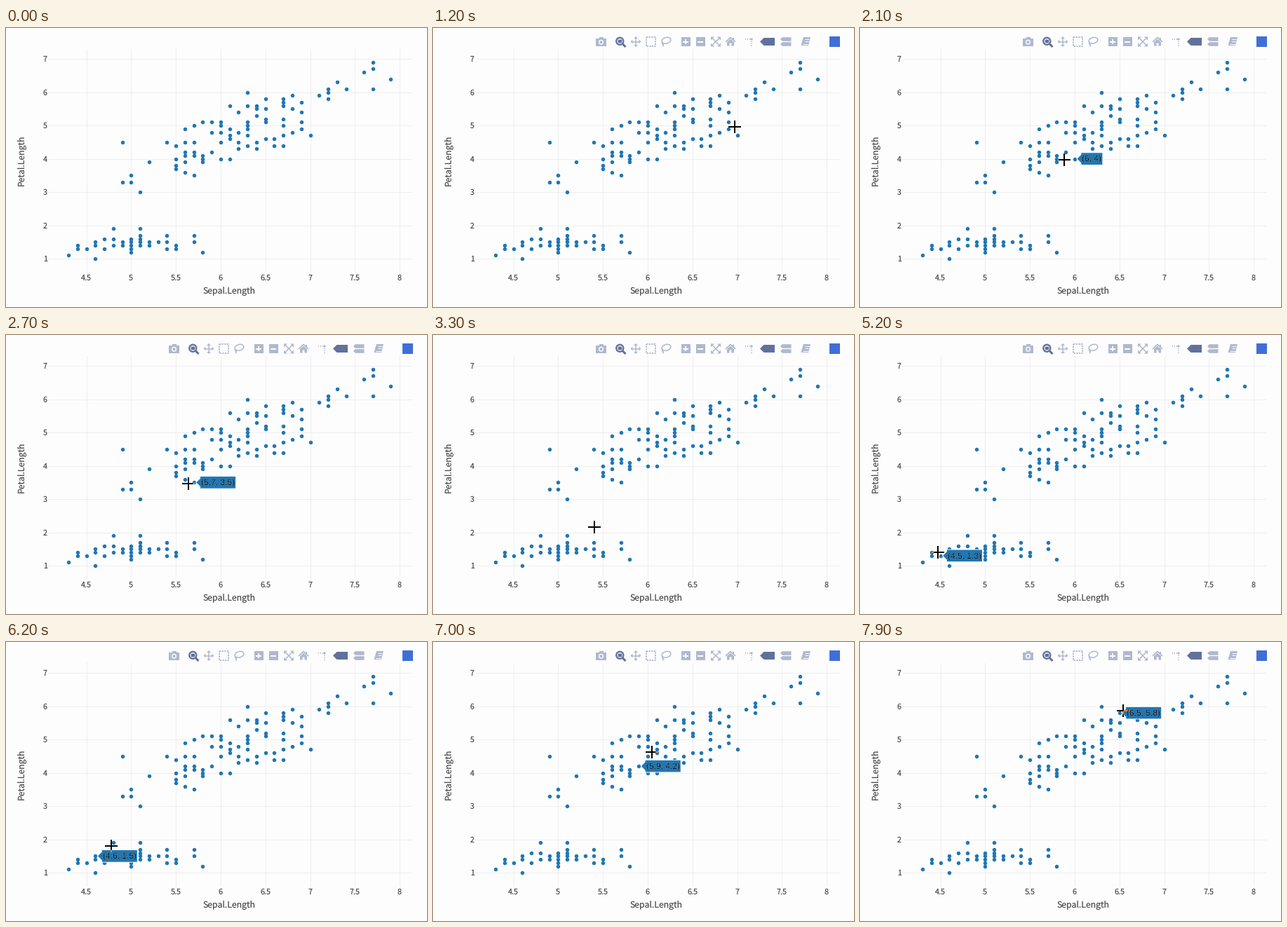
A matplotlib script that plays this animation: 600x398 px, repeating every 8000 ms.

```python
import numpy as np
import matplotlib.pyplot as plt
from matplotlib.animation import FuncAnimation
from matplotlib.patches import Circle, Ellipse, Polygon

W, H, DPI = 600, 398, 64
PT = 72 / DPI  # points per pixel
BG, BLUE, INVERSE = "#fdfdfe", "#1f77b4", "#e0884b"
GRID, INK = "#eeeef0", "#505050"
LIGHT, DARK = "#b0b8ce", "#62719b"
AXIS_FONT, TIP_FONT = "Noto Sans CJK JP", "Liberation Sans"
FRAMES, ENTER = 80, 8
REACH = 21  # hover distance in pixels

plt.rcParams["text.hinting"] = "none"

# Petal lengths (mm) for each sepal length from 4.3 in steps of 0.1
COLUMNS = [
    [11], [13, 14], [13], [10, 14, 15], [13, 16], [14, 16, 19],
    [14, 15, 33, 45], [12, 13, 14, 15, 16, 33, 35],
    [14, 15, 16, 17, 19, 30], [14, 15, 39], [15], [13, 15, 17, 45],
    [13, 14, 37, 38, 40, 44], [36, 39, 41, 42, 45, 49],
    [15, 17, 35, 41, 42, 45, 50], [12, 39, 40, 41, 51], [42, 48, 51],
    [40, 45, 48, 50, 51], [40, 46, 47, 49, 56], [43, 45, 48, 54],
    [44, 47, 49, 50, 51, 56, 60], [43, 45, 53, 55, 56],
    [46, 51, 52, 55, 58], [44, 46], [44, 47, 50, 52, 56, 57, 58],
    [48, 55, 59], [49, 51, 54, 57], [47], [59], [58, 60, 61], [63], [61],
    [], [66], [61, 67, 69], [], [64],
]
DATA = np.array([((43 + i) / 10, v / 10)
                 for i, col in enumerate(COLUMNS) for v in col])

# Pointer path: frame, x, y
PATH = np.array([
    (8, 566, 104), (11, 468, 130), (15, 333, 171), (16, 326, 174),
    (21, 291, 188), (25, 271, 198), (29, 250, 232), (33, 230, 274),
    (34, 229, 284), (38, 207, 304), (41, 179, 317), (43, 177, 316),
    (48, 140, 295), (52, 111, 310), (55, 97, 323), (58, 97, 323),
    (67, 265, 211), (70, 312, 157), (76, 359, 123), (79, 375, 98),
], float)


def px(v):
    return 178.3 + 127.6 * (v - 5)


def py(v):
    return 329.1 - 47.5 * (v - 1)


def smooth(t, keys, vals):
    """Monotone cubic through the keys, without overshoot."""
    step = np.diff(keys)
    d = np.diff(vals) / step
    m = np.zeros(len(vals))
    for k in range(1, len(d)):
        if d[k - 1] * d[k] > 0:
            m[k] = 2 * d[k - 1] * d[k] / (d[k - 1] + d[k])
    m[0], m[-1] = d[0], d[-1]
    k = int(np.clip(np.searchsorted(keys, t, "right") - 1, 0, len(d) - 1))
    h = step[k]
    u = (t - keys[k]) / h
    return ((1 + 2 * u) * (1 - u) ** 2 * vals[k] + u * (1 - u) ** 2 * h * m[k]
            + u * u * (3 - 2 * u) * vals[k + 1] + u * u * (u - 1) * h * m[k + 1])


def pointer(i):
    t, x, y = PATH.T
    return smooth(i, t, x), smooth(i, t, y)


fig = plt.figure(figsize=(W / DPI, H / DPI), dpi=DPI, facecolor=BG)
ax = fig.add_axes([0, 0, 1, 1])
ax.set_xlim(0, W)
ax.set_ylim(H, 0)
ax.axis("off")


def write(x, y, s, size, font=AXIS_FONT, color=INK, **kw):
    return ax.text(x, y, s, fontsize=size * PT, family=font, color=color,
                   va="baseline", **kw)


# ---- chart ----
LEFT, RIGHT, TOP, BOTTOM = 60, 578, 30, 348
for v in np.arange(4.5, 8.1, 0.5):
    ax.plot([px(v)] * 2, [TOP, BOTTOM], color=GRID, lw=PT, zorder=1)
    write(px(v), 360, f"{v:g}", 10.8, ha="center")
for v in range(1, 8):
    ax.plot([LEFT, RIGHT], [py(v)] * 2, color=GRID, lw=PT, zorder=1)
    write(59, py(v) + 4, str(v), 10.8, ha="right")
write(318.5, 380, "Sepal.Length", 12.2, ha="center")
write(26.5, 189, "Petal.Length", 12.2, ha="center", rotation=90,
      rotation_mode="anchor")
ax.plot([0, W], [H - 0.5] * 2, color="#cfcfd2", lw=PT)
ax.plot([W - 0.5] * 2, [0, H], color="#e2e2e5", lw=PT)

X, Y = px(DATA[:, 0]), py(DATA[:, 1])


def dots(color, z):
    return ax.scatter(X, Y, s=(5.5 * PT) ** 2, c=color, lw=0, zorder=z)


dots(BLUE, 2)

# ---- toolbar ----
bar = []


def keep(patch):
    patch.set_zorder(3 + 0.01 * len(bar))
    bar.append(ax.add_patch(patch))


def poly(*pts, c=LIGHT):
    keep(Polygon(pts, fc=c, lw=0))


def box(x0, y0, x1, y1, c=LIGHT):
    poly((x0, y0), (x1, y0), (x1, y1), (x0, y1), c=c)


def disc(x, y, r, c=LIGHT):
    keep(Circle((x, y), r, fc=c, lw=0))


def line(*pts, c=LIGHT, w=1.5, ls="-"):
    art, = ax.plot(*zip(*pts), color=c, lw=w * PT, ls=ls,
                   solid_capstyle="butt", zorder=3 + 0.01 * len(bar))
    bar.append(art)


def tag(x0, x1, y, h, c=LIGHT):
    tip = x0 + h
    poly((x0, y), (tip, y - h), (x1, y - h), (x1, y + h), (tip, y + h), c=c)


def camera(x, y):
    box(x - 7.5, y - 4.5, x + 7.5, y + 6)
    box(x - 3, y - 6.5, x + 3, y - 4)
    disc(x, y + 0.7, 3.6, BG)
    disc(x, y + 0.7, 2.1)


def magnifier(x, y):
    line((x + 3, y + 3), (x + 7.5, y + 7.5), c=DARK, w=3)
    disc(x - 0.7, y - 0.7, 6.2, DARK)
    disc(x - 0.7, y - 0.7, 4.1, "#cdd3e2")
    box(x - 3, y - 2.8, x + 1.6, y + 1.4, DARK)


def pan(x, y):
    line((x - 6, y), (x + 6, y))
    line((x, y - 6), (x, y + 6))
    for dx, dy in ((1, 0), (-1, 0), (0, 1), (0, -1)):
        poly((x + 7.5 * dx, y + 7.5 * dy),
             (x + 4.5 * dx - 3 * dy, y + 4.5 * dy + 3 * dx),
             (x + 4.5 * dx + 3 * dy, y + 4.5 * dy - 3 * dx))


def select(x, y):
    r = 6.3
    line((x - r, y - r), (x + r, y - r), (x + r, y + r), (x - r, y + r),
         (x - r, y - r), w=1.8, ls=(0, (1.3, 0.7)))


def lasso(x, y):
    keep(Ellipse((x + 0.5, y - 1.7), 13, 8.5, angle=-15, fill=False,
                 ec=LIGHT, lw=1.5 * PT))
    line((x - 4, y + 1), (x - 5.5, y + 3), (x - 3.5, y + 4.5), (x - 4.5, y + 7))


def sign(x, y, plus):
    box(x - 6.5, y - 6.5, x + 6.5, y + 6.5)
    line((x - 3.8, y), (x + 3.8, y), c=BG, w=2)
    if plus:
        line((x, y - 3.8), (x, y + 3.8), c=BG, w=2)


def autoscale(x, y):
    for sx in (-1, 1):
        line((x - 4.5 * sx, y - 4.5), (x + 4.5 * sx, y + 4.5))
        for sy in (-1, 1):
            cx, cy = x + 7 * sx, y + 7 * sy
            poly((cx, cy), (cx - 5 * sx, cy), (cx, cy - 5 * sy))


def home(x, y):
    line((x - 7, y + 0.5), (x, y - 6), (x + 7, y + 0.5), w=1.7)
    box(x + 3.3, y - 6, x + 5, y - 2)
    poly((x - 5, y + 0.7), (x, y - 3.8), (x + 5, y + 0.7), (x + 5, y + 6),
         (x + 1.5, y + 6), (x + 1.5, y + 2), (x - 1.5, y + 2),
         (x - 1.5, y + 6), (x - 5, y + 6))


def spikes(x, y):
    for k in range(3):
        box(x - 5.5 + 3 * k, y - 4.3, x - 3.8 + 3 * k, y - 2.8)
        box(x + 3.2, y - 0.8 + 3 * k, x + 4.7, y + 0.9 + 3 * k)
    disc(x + 4, y - 3.5, 1.7)


def book(x, y):
    poly((x - 3, y - 6.5), (x + 7, y - 6.5), (x + 4, y + 5.5), (x - 6.5, y + 5.5))
    for k in (-3.5, -1):
        line((x - 1.5 - k / 4, y + k), (x + 4 - k / 4, y + k), c=BG, w=1)
    line((x - 4.5, y + 3.2), (x + 3.5, y + 3.2), c=BG, w=1)


MID = 19.5
camera(239.5, MID)
magnifier(267, MID)
pan(289, MID)
select(310.5, MID)
lasso(332, MID)
sign(360, MID, True)
sign(381, MID, False)
autoscale(403, MID)
home(424, MID)
spikes(450, MID)
tag(466, 487, MID, 5.5, DARK)
tag(495, 510.5, MID - 3.5, 2.8)
tag(495, 510.5, MID + 3.5, 2.8)
book(531, MID)
box(565, 12, 580, 27, "#3f6fd6")

# ---- hover label and inverting cross cursor ----
NOWHERE = np.full((3, 2), -50.0)
cross = ax.add_patch(Polygon(NOWHERE, fc="black", lw=0, zorder=6))


def hover(fill, ink, z):
    tip = ax.add_patch(Polygon(NOWHERE, fc=fill, ec="white", lw=0.9 * PT,
                               joinstyle="miter", zorder=z))
    return tip, write(0, 0, "", 12, TIP_FONT, ink, zorder=z + 0.5)


labels = [hover(BLUE, "white", 4), hover(INVERSE, "black", 8)]
labels[1][0].set_edgecolor("none")
for art in (dots(INVERSE, 7), *labels[1]):
    art.set_clip_on(True)
    art.set_clip_path(cross)


def nearest(i):
    if i < ENTER:
        return None
    x, y = pointer(i)
    dist = np.hypot(X - x, Y - y)
    k = int(dist.argmin())
    return k if dist[k] < REACH else None


def cross_points(x, y, a=9, b=1):
    pts = [(-a, -b), (-b, -b), (-b, -a), (b, -a), (b, -b), (a, -b),
           (a, b), (b, b), (b, a), (-b, a), (-b, b), (-a, b)]
    return np.array(pts) + (round(x), round(y))


def tip_points(x, y, w, h=8.8):
    l, r = x + 9, x + 9 + w
    return [(x + 3, y), (l, y - 6), (l, y - h), (r, y - h), (r, y + h),
            (l, y + h), (l, y + 6)]


def draw(i):
    fade = min(max((i - ENTER + 1) / 3, 0), 1)
    for art in bar:
        art.set_alpha(fade)
    cross.set_xy(cross_points(*pointer(i)) if i >= ENTER else NOWHERE)

    k = nearest(i - 1)  # the label trails the pointer by one step
    text = "" if k is None else "({:g}, {:g})".format(*DATA[k])
    digits = sum(c.isdigit() for c in text)
    width = 12 * (0.556 * digits + 0.278 * (len(text) - digits - 2) + 0.666) + 3
    for tip, words in labels:
        tip.set_visible(k is not None)
        words.set_text(text)
        if k is not None:
            tip.set_xy(tip_points(X[k], Y[k], width))
            words.set_position((X[k] + 10.4, Y[k] + 4.2))
    return []


anim = FuncAnimation(fig, draw, frames=FRAMES, init_func=lambda: draw(0),
                     interval=100, repeat=True, repeat_delay=0, blit=False)
plt.show()
```
